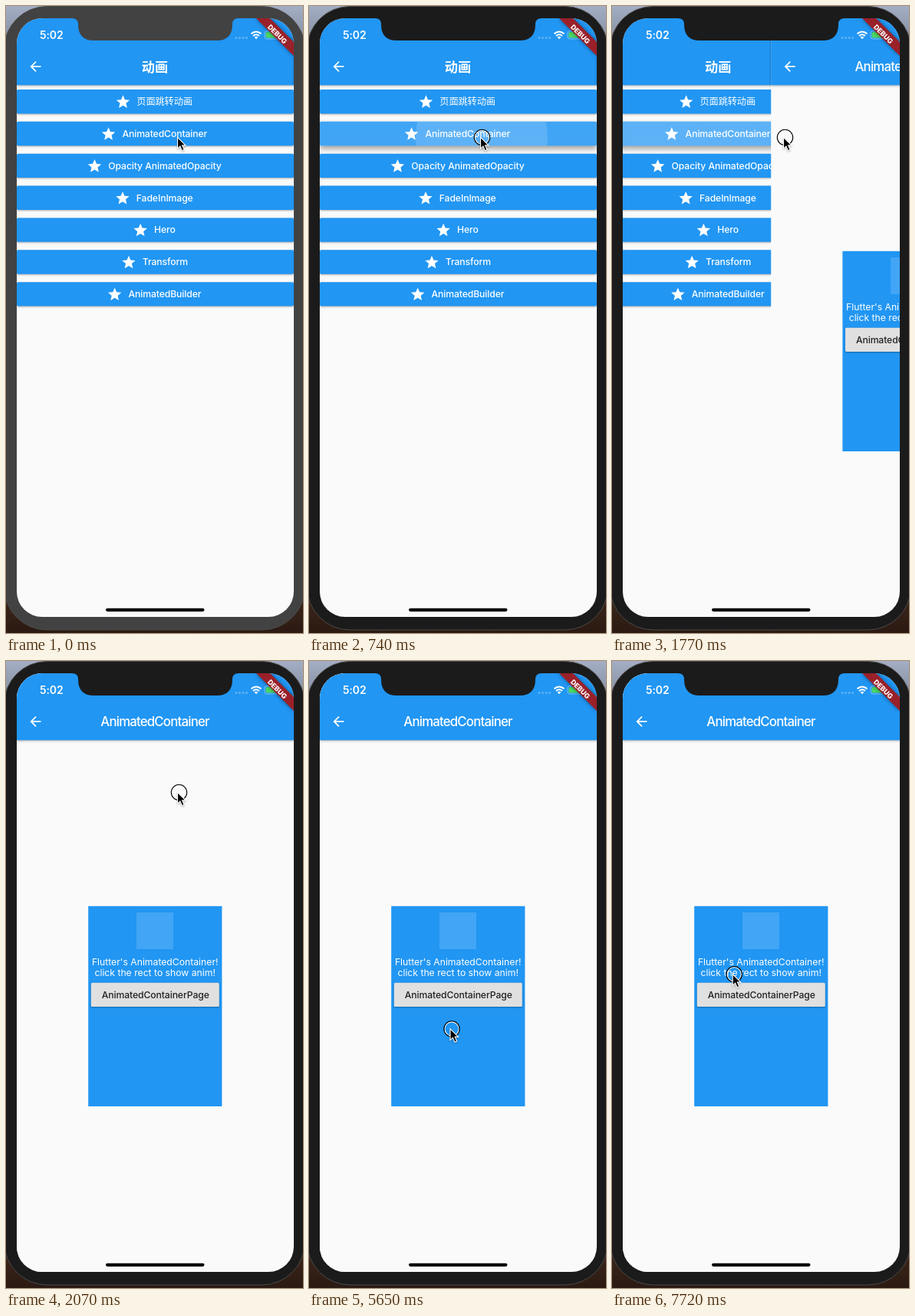
An HTML page that plays this animation: 387 by 818 pixels, repeating every 8000 ms.

```html
<!DOCTYPE html>
<html lang="zh">
<head>
<meta charset="utf-8">
<title>AnimatedContainer</title>
<style>
html, body { margin: 0; width: 100%; height: 100%; overflow: hidden; background: #2b1a12; }
svg { display: block; width: 387px; height: 818px; }
text { font-family: Inter, "Noto Sans CJK SC", "Noto Sans CJK", "Noto Sans", sans-serif; fill: #fff; }
.title { font-size: 16.8px; font-weight: 500; letter-spacing: -.8px; text-anchor: middle; }
.cjk { font-size: 17.2px; letter-spacing: 0; font-weight: 600; }
.label { font-size: 12.2px; font-weight: 500; letter-spacing: -.1px; }
.body { font-size: 12.2px; text-anchor: middle; }
.bar { fill: #2196f3; filter: drop-shadow(0 1.5px 1.5px rgba(0,0,0,.3)); }
.raised { filter: drop-shadow(0 1.5px 1px rgba(0,0,0,.32)); }
.pressed { filter: drop-shadow(0 4px 3.5px rgba(0,0,0,.36)); }
</style>
</head>
<body>
<svg viewBox="0 0 387 818">
  <defs>
    <linearGradient id="desk" x2="0" y2="1">
      <stop offset="0" stop-color="#a3aec4"/>
      <stop offset=".1" stop-color="#6e7585"/>
      <stop offset=".9" stop-color="#4a2f20"/>
      <stop offset="1" stop-color="#2b1a12"/>
    </linearGradient>
    <clipPath id="screen"><rect x="14" y="16" width="361" height="781" rx="33"/></clipPath>
    <clipPath id="pressArea"><rect x="14" y="150.9" width="361" height="31.4" rx="1.7"/></clipPath>
    <path id="star" d="M12 17.27L18.18 21l-1.64-7.03L22 9.24l-7.19-.61L12 2 9.19 8.63 2 9.24l5.46 4.73L5.82 21z" fill="#fff"/>
    <path id="back" d="M20 11H7.83l5.59-5.59L12 4l-8 8 8 8 1.41-1.41L7.83 13H20z" fill="#fff" transform="translate(28 68.5) scale(.872)"/>
  </defs>

  <rect width="387" height="818" fill="url(#desk)"/>
  <rect id="bezel" x="-2.5" y=".5" width="392" height="813.5" rx="56" stroke="#4c4a49"/>

  <g clip-path="url(#screen)">
    <g id="listPage">
      <rect x="14" y="16" width="361" height="781" fill="#fafafa"/>
      <g id="rows"></g>
      <rect class="bar" x="14" y="16" width="361" height="87.3"/>
      <use href="#back"/>
      <text class="title cjk" x="194" y="85.5">动画</text>
    </g>

    <g id="detailPage">
      <rect x="14" y="16" width="361" height="781" fill="#fafafa"/>
      <rect class="bar" x="14" y="16" width="361" height="87.3"/>
      <use href="#back"/>
      <text class="title" x="194" y="85">AnimatedContainer</text>
      <rect x="107.2" y="319.8" width="174.2" height="261.2" fill="#2196f3"/>
      <rect x="170" y="328" width="48" height="48" fill="#42a5f5"/>
      <text class="body" x="194.2" y="396.5">Flutter's AnimatedContainer!</text>
      <text class="body" x="194.2" y="411.3">click the rect to show anim!</text>
      <rect class="raised" x="110.8" y="419.8" width="167" height="31.3" rx="1.7" fill="#e0e0e0"/>
      <text class="label" x="124.7" y="439.8" style="fill:#212121">AnimatedContainerPage</text>
    </g>

    <text x="44" y="43" font-size="14" font-weight="600" letter-spacing="-.1">5:02</text>
    <g fill="#fff" opacity=".28">
      <circle cx="300" cy="41.5" r="1.5"/><circle cx="304.5" cy="41.5" r="1.5"/>
      <circle cx="309" cy="41.5" r="1.5"/><circle cx="313.5" cy="41.5" r="1.5"/>
    </g>
    <g fill="none" stroke="#fff" stroke-width="2">
      <path d="M319.5 36.3Q326 30.6 332.5 36.3M322 39Q326 35.6 330 39"/>
      <path d="M326 43.3l-2.4-2.6q2.4-1.9 4.8 0z" fill="#fff" stroke="none"/>
    </g>
    <rect x="337" y="32.5" width="22" height="10.5" rx="3" fill="none" stroke="#fff" stroke-opacity=".4"/>
    <rect x="338.5" y="34" width="19" height="7.5" rx="1.8" fill="#4cd964"/>
    <path d="M326 16H344L375 47V65z" fill="#9a2029" style="filter:drop-shadow(0 0 2.5px rgba(0,0,0,.5))"/>
    <text transform="translate(353.6 36.6) rotate(45)" y="3.3" font-size="9" font-weight="800" text-anchor="middle">DEBUG</text>
    <rect x="130" y="785.7" width="128.5" height="4.3" rx="2.15" fill="#000"/>
  </g>

  <path id="notch" d="M86 14H303V16Q295 16 295 24C295 38 288 45 275 45H114C101 45 94 38 94 24Q94 16 86 16z"/>

  <g id="cursor">
    <g id="ring" fill="none">
      <circle r="9.2" stroke="#fff" stroke-width="1.2"/>
      <circle r="10.2" stroke="#000" stroke-width="1.1"/>
    </g>
    <path d="M-2-.2V14.6L1.4 11.4 3.9 17.2 6.6 16 4.2 10.4H8.6z" stroke="#fff" stroke-width="1.1"
      style="filter:drop-shadow(0 1px 1px rgba(0,0,0,.3))"/>
  </g>
</svg>

<script>
const LOOP = 8000, TICK = 148.6, FIRST = 135;
const el = id => document.getElementById(id);

const rows = [
  ['页面跳转动画', 152.5], ['AnimatedContainer', 133.6], ['Opacity AnimatedOpacity', 115.5],
  ['FadeInImage', 152], ['Hero', 175.2], ['Transform', 160], ['AnimatedBuilder', 141.7]
];
el('rows').innerHTML = rows.map(([label, x], i) => {
  const y = 109 + 41.86 * i;
  const press = i !== 1 ? '' : `<g clip-path="url(#pressArea)" fill="#fff" fill-opacity=".145">
    <rect id="highlight" x="14" y="150" width="361" height="34"/><circle id="splash" cx="225" cy="171"/></g>`;
  return `<rect id="row${i}" class="raised" x="14" y="${y}" width="361" height="31.4" rx="1.7" fill="#2196f3"/>${press}
    <use href="#star" transform="translate(${x - 10.5} ${y + 5.6}) scale(.872)"/>
    <text class="label" x="${x + 17.8}" y="${y + 20}">${label}</text>`;
}).join('');

// Pointer stops: time, x, y
const path = [
  [0, 225.5, 171.5],
  [3410, 214, 250], [3560, 186, 470], [3710, 172, 608], [3860, 189, 560], [4010, 199.7, 496.5],
  [5650, 186, 480], [5800, 152, 445], [5950, 131, 420], [6100, 140, 405],
  [6240, 166, 400], [6390, 196.8, 403], [6540, 211, 397], [6690, 217.5, 402.5],
  [6840, 220, 405], [6980, 221, 407],
  [7280, 205, 405], [7430, 180, 407], [7580, 156, 410], [7720, 159.2, 408.7]
];

const clamp = v => Math.max(0, Math.min(1, v));

function draw(t) {
  const s = t < FIRST ? 0 : FIRST + Math.floor((t - FIRST) / TICK) * TICK;

  const shell = t < 140 ? '#424242' : '#1b1b1b';
  el('bezel').setAttribute('fill', shell);
  el('notch').setAttribute('fill', shell);

  const held = s > 400;
  el('highlight').setAttribute('visibility', held ? 'visible' : 'hidden');
  el('splash').setAttribute('r', held ? 213 * clamp((s - 330) / 990) : 0);
  el('row1').setAttribute('class', held ? 'pressed' : 'raised');

  const slide = 1 - Math.pow(1 - clamp((s - 1700) / 370), 3);
  el('detailPage').setAttribute('transform', `translate(${361 * (1 - slide)} 0)`);
  el('listPage').setAttribute('transform', `translate(${-120 * slide} 0)`);

  const [, x, y] = path.filter(p => p[0] <= t).pop();
  el('cursor').setAttribute('transform', `translate(${x} ${y})`);
  el('ring').setAttribute('visibility', t < 285 ? 'hidden' : 'visible');
}

const start = performance.now();
function loop() {
  draw((performance.now() - start) % LOOP);
  requestAnimationFrame(loop);
}
loop();
</script>
</body>
</html>
```
